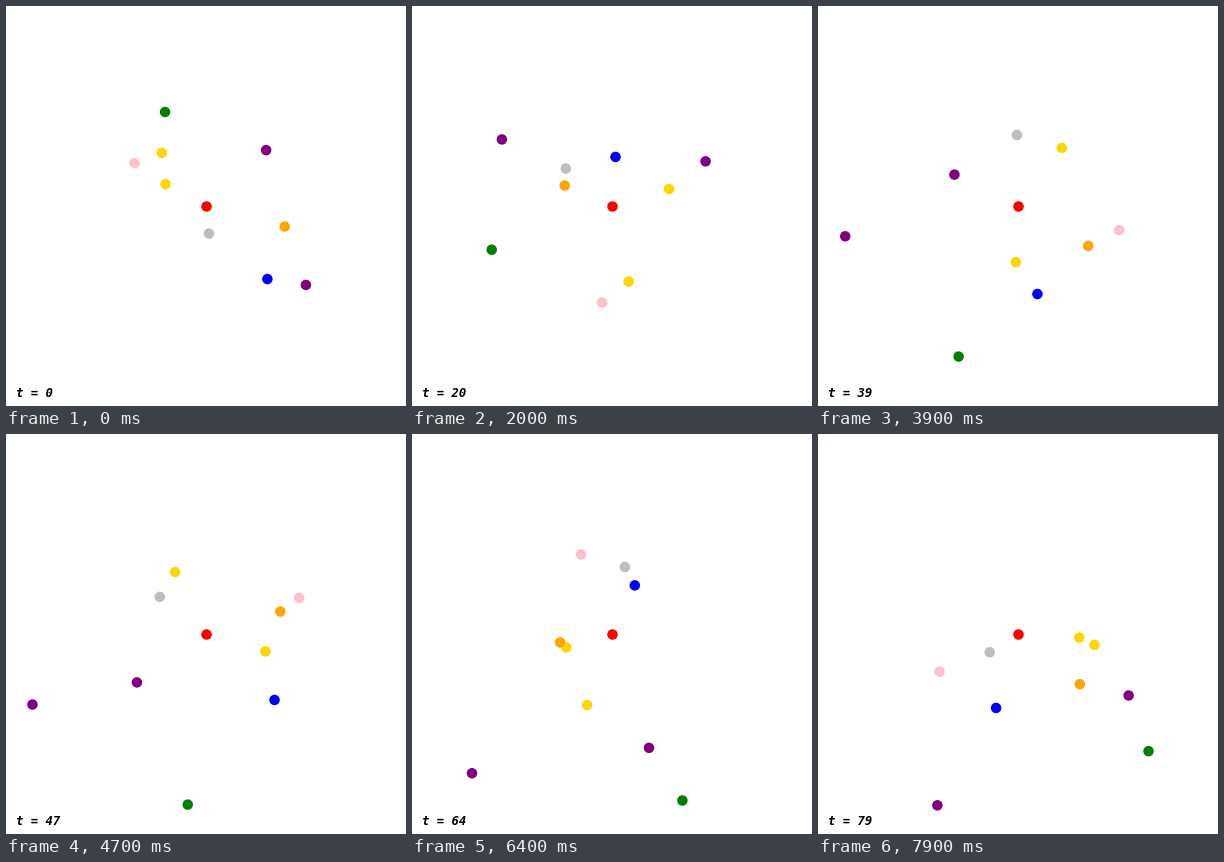
Animation of 400x400 px, one loop 8000 ms. Source, as a matplotlib script:

```python
import numpy as np
import matplotlib.pyplot as plt
from matplotlib.animation import FuncAnimation

SIZE, DPI = 400, 100
FRAMES, INTERVAL = 80, 100
SUN = np.array([200.5, 199.5])
DOT = 10.5      # diameter in pixels
RATE = 4680     # degrees per frame at a = 1, scales with a ** -1.5

# colour, semi-major axis, eccentricity, periapsis angle, mean anomaly at t = 0
PLANETS = [
    ("#bebebe", 49.71, 0.4539, -79.82, -1.67),
    ("gold", 54.05, 0.1372, 156.71, -4.0),
    ("gold", 73.61, 0.0521, 136.51, -6.1),
    ("orange", 66.41, 0.2153, 164.29, 182.05),
    ("blue", 70.48, 0.3438, 129.37, 181.2),
    ("pink", 93.88, 0.1053, 151.86, -2.4),
    ("purple", 98.92, 0.2801, 140.97, 181.3),
    ("purple", 139.75, 0.4130, 44.18, -0.3),
    ("green", 141.66, 0.2716, 114.5, -0.45),
]
colors = ["red"] + [p[0] for p in PLANETS]
axis, ecc, peri, phase = np.array([p[1:] for p in PLANETS]).T
peri = np.radians(peri)


def positions(t):
    """Solve Kepler's equation and return the sun and planets in pixels."""
    mean = np.radians(phase + RATE * axis ** -1.5 * t)
    anomaly = mean + ecc * np.sin(mean)
    for _ in range(6):
        error = anomaly - ecc * np.sin(anomaly) - mean
        anomaly -= error / (1 - ecc * np.cos(anomaly))
    u = axis * (np.cos(anomaly) - ecc)
    v = axis * np.sqrt(1 - ecc ** 2) * np.sin(anomaly)
    x = u * np.cos(peri) - v * np.sin(peri)
    y = u * np.sin(peri) + v * np.cos(peri)
    return np.vstack([SUN, SUN + np.column_stack([x, y])])


fig = plt.figure(figsize=(SIZE / DPI, SIZE / DPI), dpi=DPI, facecolor="white")
ax = fig.add_axes([0, 0, 1, 1], xlim=(0, SIZE), ylim=(0, SIZE))
ax.axis("off")

start = positions(0)
dots = ax.scatter(start[:, 0], start[:, 1], s=(DOT * 72 / DPI) ** 2,
                  c=colors, linewidths=0)
label = ax.text(10, 9, "t = 0", family="DejaVu Sans Mono", size=8.8,
                weight="bold", style="italic", color="black")


def update(t):
    dots.set_offsets(positions(t))
    label.set_text(f"t = {t}")
    return dots, label


anim = FuncAnimation(fig, update, frames=FRAMES, interval=INTERVAL,
                     repeat=True, repeat_delay=0)
plt.show()
```
